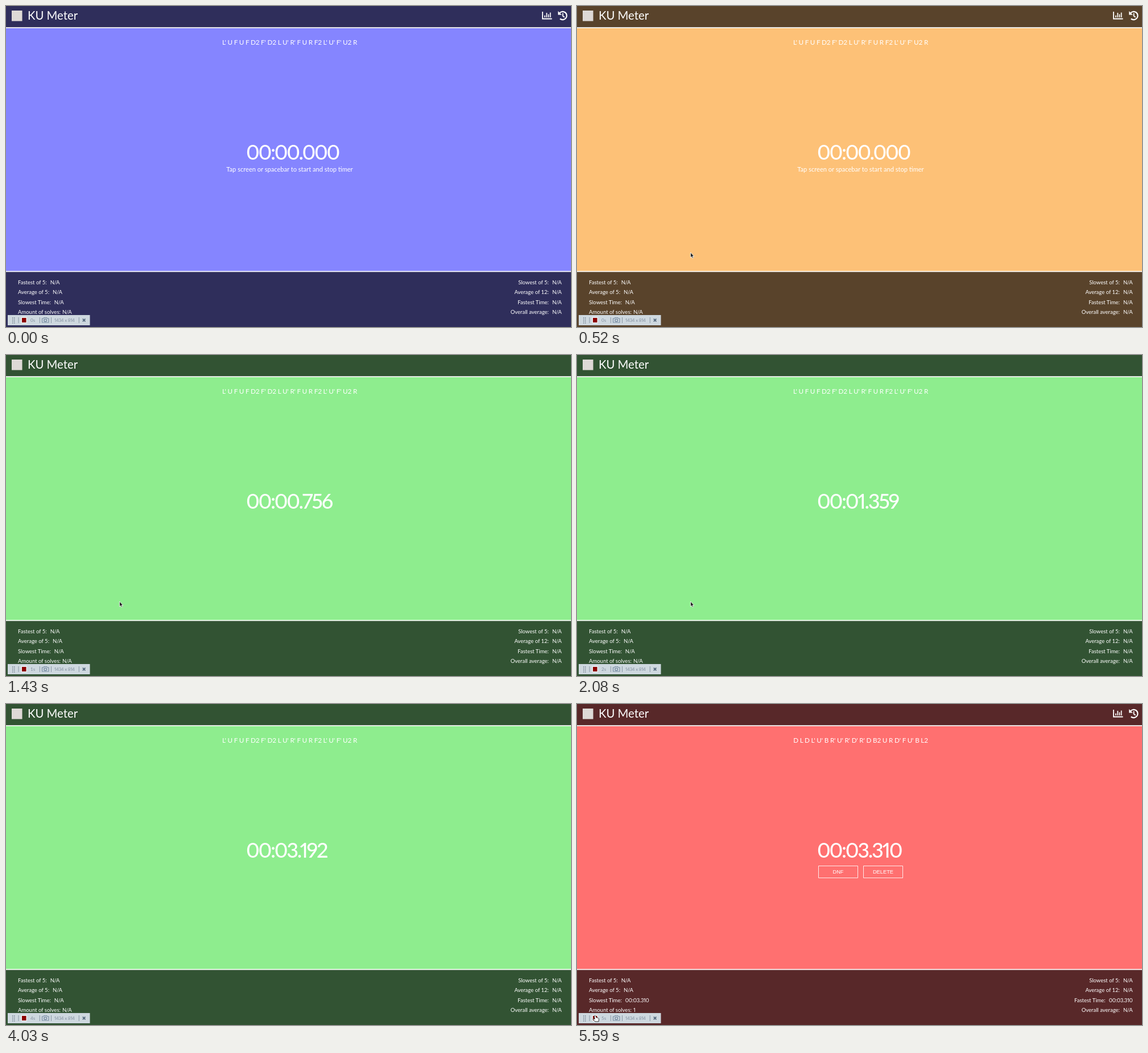
An HTML page that plays this animation: 993x564 px, repeating every 5.72 s.

```html
<!DOCTYPE html>
<html lang="en">
<head>
<meta charset="utf-8">
<title>Solve timer</title>
<style>
  html, body { margin: 0; width: 100%; height: 100%; overflow: hidden; }
  svg { display: block; width: 993px; height: 564px; font: 9.5px Lato, sans-serif; fill: #fff; }
  .middle { text-anchor: middle; }
  .end { text-anchor: end; }
  .digits { letter-spacing: -.03em; font-variant-numeric: proportional-nums; }
  #clock { font-size: 36px; font-weight: 500; letter-spacing: -.063em; }
  #scramble { font-size: 11.7px; letter-spacing: -.18px; }
  .button { font: 9.3px "Liberation Sans", Arial, sans-serif; text-anchor: middle; }
  .line { fill: none; stroke: #fff; }
</style>
</head>
<body>
<svg viewBox="0 0 993 564">
  <rect id="dark" width="993" height="564"/>
  <rect y="37.3" width="993" height="430"/>
  <rect id="bright" y="39" width="993" height="426.6"/>

  <rect x="10" y="8" width="18.5" height="18.5" fill="#ded9d6"/>
  <text x="38" y="24" font-size="20.3">KU Meter</text>
  <g id="icons" class="line">
    <path d="M943 10V22.5H959.5" stroke-width="1.8"/>
    <path d="M947 16.5V20M950.3 12V20M953.5 14.5V20M956.7 11.5V20" stroke-width="1.7"/>
    <path d="M972.5 13A7.1 7.1 0 1 1 973.7 22.3" stroke-width="2.2"/>
    <path d="M978.6 12.5V17.5L981.6 19.7" stroke-width="1.8"/>
    <path d="M970.2 9V15.6H976.8Z" fill="#fff" stroke="none"/>
  </g>

  <text id="scramble" class="middle" x="498.5" y="68"></text>
  <text id="clock" class="digits" x="422" y="270"></text>
  <text id="hint" class="middle" x="498.5" y="291" font-size="11.1">Tap screen or spacebar to start and stop timer</text>
  <g id="buttons">
    <path class="line" stroke-opacity=".85" d="M424.5 284.5h69v21h-69zM503.5 284.5h69v21h-69z"/>
    <text class="button" x="459" y="298">DNF</text>
    <text class="button" x="538" y="298">DELETE</text>
  </g>

  <g id="stats"></g>

  <g id="recorder" fill="#8491a1" font-size="8">
    <rect x="3" y="543" width="144.5" height="18" fill="#ced8df"/>
    <path d="M11.7 547V558M14.7 547V558" stroke="#657180" stroke-width="1.3" stroke-dasharray="1.3 1.2"/>
    <path d="M22 547V557M59.3 547V557M79.5 547V557M128.3 547V557" stroke="#8795a3"/>
    <rect x="26.5" y="546.5" width="10.5" height="11" fill="#eef1f2"/>
    <rect id="record" x="28" y="548" width="7.5" height="8"/>
    <text id="seconds" x="43" y="555"></text>
    <path d="M63.5 549H66L67 547.5H71.5L72.5 549H75V556H63.5Z" fill="none" stroke="#788da3" stroke-width="1.2"/>
    <circle cx="69.2" cy="552.2" r="2.3" fill="none" stroke="#788da3" stroke-width="1.4"/>
    <text class="digits" x="85" y="555">1434 x 814</text>
    <path d="M134.8 549.7L139.4 554.3M139.4 549.7L134.8 554.3" stroke="#53677c" stroke-width="1.7"/>
  </g>

  <path id="arrow" d="M0 0V9L2 7.2L3.4 10.3L5 9.6L3.6 6.7H6.4Z" fill="#222" stroke="#fff" stroke-width=".8"/>
  <path id="hand" d="M-1.5 0Q0 -1.5 1 .5L2 3L5 3.5L6.5 5L6 10H0L-4 6Q-4 4.5 -2.5 5L-.8 6Z" fill="#fff" stroke="#222" stroke-width=".9"/>
</svg>
<script>
  const LOOP = 5720, STEP = 130;
  const ARM = 520, START = 650, POINTER_IDLE = 2600, STOP = 4160, LEAVE = 5200;
  const themes = {
    idle: ['#8585ff', '#2f2e5b'],
    armed: ['#fdc177', '#59432b'],
    running: ['#8eed8e', '#325333'],
    stopped: ['#ff7070', '#582829']
  };
  const scrambles = [
    "L' U F U F D2 F' D2 L U' R' F U R F2 L' U' F' U2 R",
    "D L D L' U' B R' U' R' D' R' D B2 U R D' F U' B L2"
  ];
  const clockKeys = [[START, 33], [2080, 1359], [3120, 2364], [STOP, 3310]];
  const rest = [199.5, 433], recordButton = [32, 548];

  const byId = id => document.getElementById(id);
  const show = (id, visible) => byId(id).setAttribute('visibility', visible ? 'visible' : 'hidden');
  const fill = (id, color) => byId(id).setAttribute('fill', color);
  const setText = (id, text) => byId(id).textContent = text;
  const mix = (a, b, p) => a + (b - a) * p;

  function addStats(labels, side, x) {
    byId('stats').innerHTML += labels.map((label, i) =>
      `<text class="${side}" x="${x}" y="${489 + i * 17.4}">${label}:` +
      `<tspan id="${label}" class="digits" dx="${label.startsWith('Amount') ? 3 : 6}">N/A</tspan></text>`).join('');
  }
  addStats(['Fastest of 5', 'Average of 5', 'Slowest Time', 'Amount of solves'], 'start', 21);
  addStats(['Slowest of 5', 'Average of 12', 'Fastest Time', 'Overall average'], 'end', 976.5);

  function elapsed(t) {
    if (t < START) return 0;
    const i = clockKeys.findIndex(([time]) => t < time);
    if (i < 0) return clockKeys.at(-1)[1];
    const [[t0, v0], [t1, v1]] = [clockKeys[i - 1], clockKeys[i]];
    return Math.round(mix(v0, v1, (t - t0) / (t1 - t0)));
  }

  function formatTime(ms) {
    const pad = (n, size) => String(n).padStart(size, '0');
    return `${pad(Math.floor(ms / 60000), 2)}:${pad(Math.floor(ms / 1000) % 60, 2)}.${pad(ms % 1000, 3)}`;
  }

  function drawPointer(t) {
    const leaving = t >= LEAVE;
    const linear = leaving ? (t - LEAVE + STEP) / (4 * STEP) : Math.min(1, t / (3 * STEP));
    const p = linear * linear * (3 - 2 * linear);
    const [from, to] = leaving ? [rest, recordButton] : [recordButton, rest];
    const place = `translate(${mix(from[0], to[0], p)} ${mix(from[1], to[1], p)})`;
    const overButton = leaving && linear >= 1;
    for (const id of ['arrow', 'hand']) byId(id).setAttribute('transform', place);
    show('arrow', t > 0 && (t < POINTER_IDLE || leaving) && !overButton);
    show('hand', overButton);
  }

  function draw(t) {
    const state = t < ARM ? 'idle' : t < START ? 'armed' : t < STOP ? 'running' : 'stopped';
    const stopped = state === 'stopped';
    const time = formatTime(elapsed(t));
    fill('bright', themes[state][0]);
    fill('dark', themes[state][1]);
    fill('record', t >= STOP && t < LEAVE ? '#f52b2b' : '#8b0000');
    show('icons', state !== 'running');
    show('hint', t < START);
    show('buttons', stopped);
    setText('scramble', scrambles[+stopped]);
    setText('clock', time);
    setText('seconds', Math.floor(t / 1000) + 's');
    for (const id of ['Slowest Time', 'Fastest Time']) setText(id, stopped ? time : 'N/A');
    setText('Amount of solves', stopped ? '1' : 'N/A');
    drawPointer(t);
  }

  const begin = performance.now();
  function tick() {
    const t = (performance.now() - begin) % LOOP;
    draw(Math.floor(t / STEP) * STEP);
    requestAnimationFrame(tick);
  }
  tick();
</script>
</body>
</html>
```
